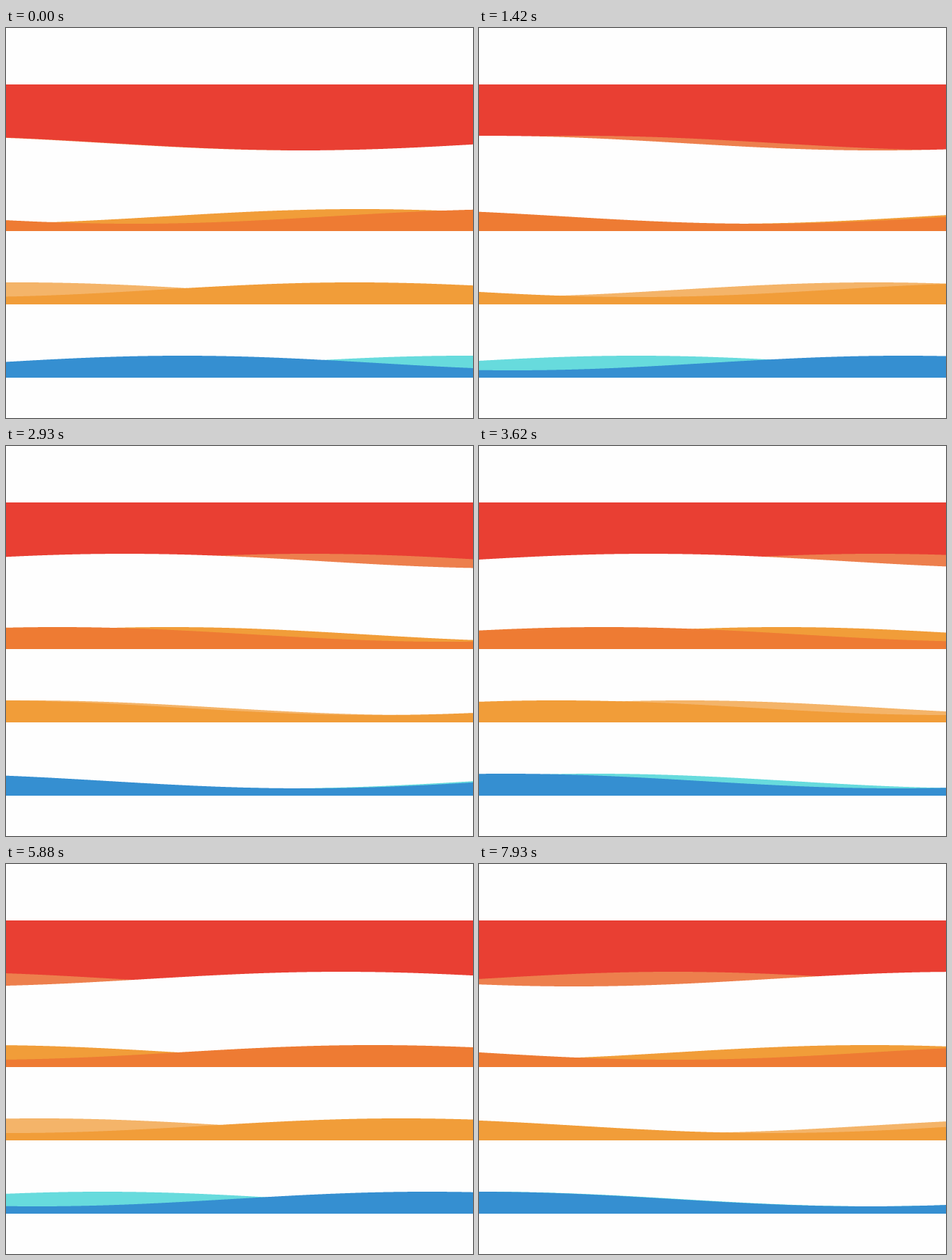
Write an HTML page with a canvas that moves like this. It is 637 by 532 pixels and loops after 7.99 s.

```html
<!DOCTYPE html>
<html lang="en">
<head>
<meta charset="utf-8">
<title>Waves</title>
<style>
  html, body { margin: 0; width: 100%; height: 100%; overflow: hidden; background: #fefefe; }
  canvas { display: block; }
</style>
</head>
<body>
<canvas id="stage" width="637" height="532"></canvas>
<script>
const WIDTH = 637;
const LOOP = 7990;          // ms
const WAVELENGTH = 1065;    // px
const AMPLITUDE = 10;       // px
const SECTION = 100;        // px
const PAPER = '#fefefe';

// crest: x of a wave top at time 0; speed in px per ms
const sections = [
  { top: 77, fill: '#e93f33',
    back:  { color: '#ed7f4d', crest: -122, speed: 0.183 },
    front: { color: PAPER,     crest: -131, speed: 0.1 } },
  { top: 177, fill: PAPER,
    back:  { color: '#f19d39', crest: -583, speed: 0.275 },
    front: { color: '#ee7b33', crest: -358, speed: 0.146 } },
  { top: 277, fill: PAPER,
    back:  { color: '#f4b469', crest: 17,   speed: 0.367 },
    front: { color: '#f19d39', crest: -590, speed: 0.192 } },
  { top: 377, fill: PAPER,
    back:  { color: '#67dbdd', crest: 627,  speed: 0.459 },
    front: { color: '#358fd1', crest: -825, speed: 0.238 } },
];

const ctx = document.getElementById('stage').getContext('2d');

function drawWave({ color, crest, speed }, top, time) {
  const peak = crest + speed * time;
  const middle = top + 80;
  const bottom = top + SECTION;
  ctx.fillStyle = color;
  ctx.beginPath();
  ctx.moveTo(0, bottom);
  for (let x = 0; x <= WIDTH; x++) {
    ctx.lineTo(x, middle - AMPLITUDE * Math.cos(2 * Math.PI * (x - peak) / WAVELENGTH));
  }
  ctx.lineTo(WIDTH, bottom);
  ctx.fill();
}

function draw(time) {
  for (const { top, fill, back, front } of sections) {
    ctx.fillStyle = fill;
    ctx.fillRect(0, top, WIDTH, SECTION);
    // White leaves no seam of the section colour along its lower edge
    drawWave(back, top, time);
    drawWave(front, top, time);
  }
}

const start = performance.now();
function tick() {
  draw((performance.now() - start) % LOOP);
  requestAnimationFrame(tick);
}
tick();
</script>
</body>
</html>
```
